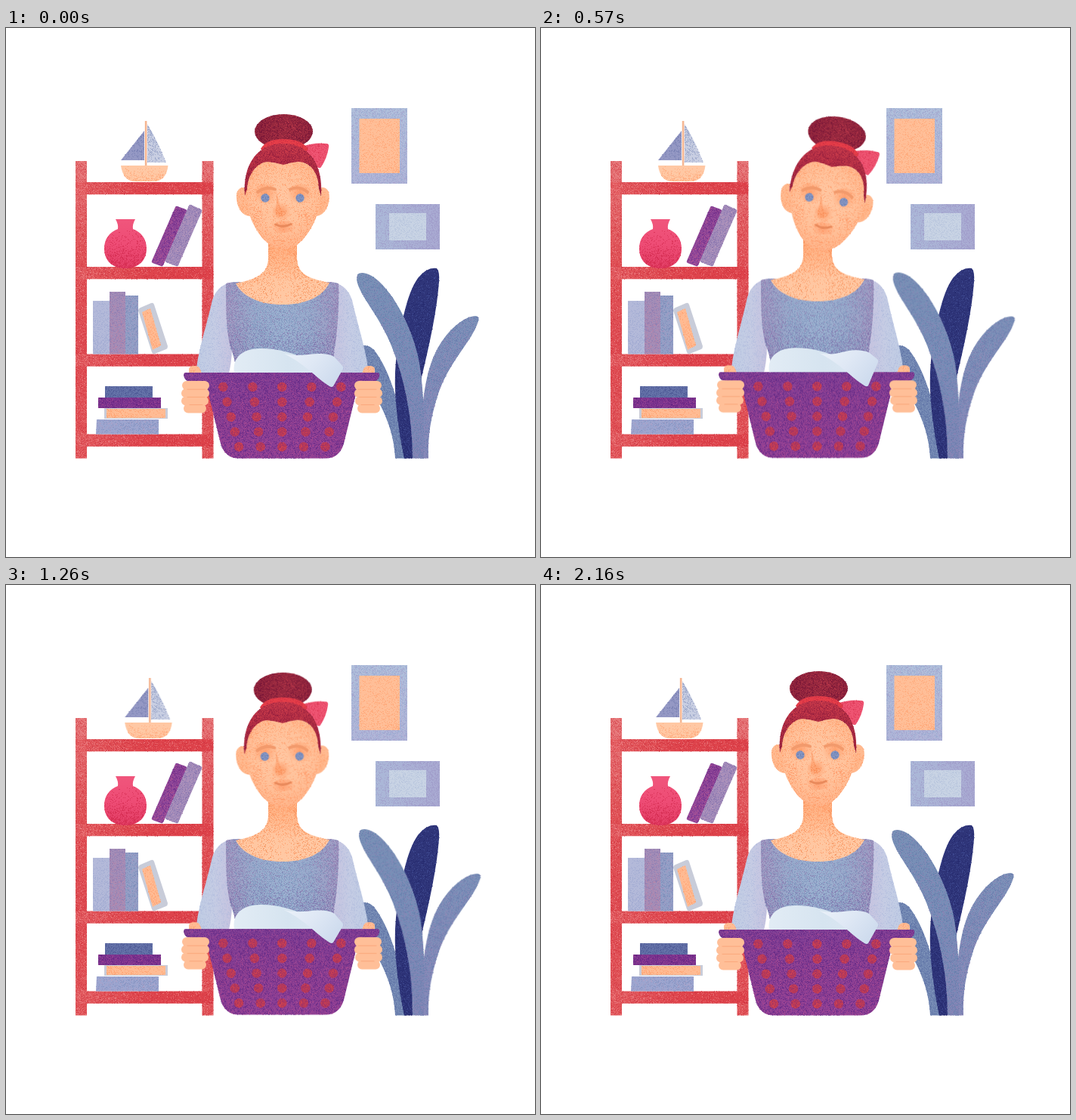
Recreate the animation shown at these times as an HTML page with a canvas. Size 700 px wide and 700 px high, loop 2190 ms.

```html
<!DOCTYPE html>
<html lang="en">
<head>
<meta charset="utf-8">
<title>Laundry day</title>
<style>
  html, body { margin: 0; width: 100%; height: 100%; overflow: hidden; background: #fff; }
  canvas { display: block; }
</style>
</head>
<body>
<canvas id="stage" width="700" height="700"></canvas>
<script>
const SIZE = 700, LOOP = 2190, STEP = 30;
const ctx = document.getElementById('stage').getContext('2d');

const layer = () => {
  const c = document.createElement('canvas');
  c.width = c.height = SIZE;
  return c;
};
const dust = layer();
const dustCtx = dust.getContext('2d', { willReadFrequently: true });

let seed = 7;
const random = () => (seed = (seed * 1664525 + 1013904223) >>> 0) / 4294967296;

// Gradients: stops are colours, or numbers for grain density.
const addStops = (grad, stops) => {
  stops.forEach((s, i) => grad.addColorStop(i / (stops.length - 1),
    typeof s === 'number' ? `rgba(0,0,0,${s})` : s));
  return grad;
};
const ramp = (x0, y0, x1, y1, ...stops) => addStops(ctx.createLinearGradient(x0, y0, x1, y1), stops);
const glow = (x, y, r, ...stops) => addStops(ctx.createRadialGradient(x, y, 0, x, y, r), stops);
const even = a => ramp(0, 0, 1, 0, a, a);

const box = (x, y, w, h) => `M${x} ${y}h${w}v${h}h${-w}z`;
const oval = (x, y, rx, ry) => `M${x - rx} ${y}a${rx} ${ry} 0 1 0 ${2 * rx} 0a${rx} ${ry} 0 1 0 ${-2 * rx} 0z`;

// A sprite gets a painter: paint(path, fill, grain colour, grain density, ...).
function sprite(draw) {
  const canvas = layer(), g = canvas.getContext('2d');
  const paint = (d, fill, ...grains) => {
    const path = new Path2D(d);
    if (fill) { g.fillStyle = fill; g.fill(path); }
    for (let i = 0; i < grains.length; i += 2) grain(path, grains[i], grains[i + 1]);
  };
  const grain = (path, color, density) => {
    dustCtx.clearRect(0, 0, SIZE, SIZE);
    dustCtx.fillStyle = density;
    dustCtx.fill(path);
    const img = dustCtx.getImageData(0, 0, SIZE, SIZE), px = img.data;
    for (let i = 3; i < px.length; i += 4)
      if (px[i]) px[i] = random() * 255 < px[i] ? 155 : 0;
    dustCtx.putImageData(img, 0, 0);
    dustCtx.globalCompositeOperation = 'source-in';
    dustCtx.fillStyle = color;
    dustCtx.fillRect(0, 0, SIZE, SIZE);
    dustCtx.globalCompositeOperation = 'source-over';
    g.drawImage(dust, 0, 0);
  };
  const line = (d, color, width) => {
    g.strokeStyle = color; g.lineWidth = width; g.lineCap = g.lineJoin = 'round';
    g.stroke(new Path2D(d));
  };
  draw(paint, line, g);
  return canvas;
}

const mirrored = (draw, axis = 365) => (paint, line, g) => {
  draw(paint, line);
  g.save();
  g.translate(2 * axis, 0);
  g.scale(-1, 1);
  draw(paint, line);
  g.restore();
};

const room = sprite(paint => {
  const bars = [204, 316, 431.5, 537.5].map(y => box(92, y, 182, 16.3)).join('');
  paint(box(92, 176, 15, 393.5) + box(259.5, 176, 15, 393.5),
    ramp(0, 176, 0, 569, '#e57678', '#e05257', '#df4d53', '#e2585c'), '#ee9296', even(.13), '#d02f3c', even(.2));
  paint(bars, ramp(92, 0, 274, 0, '#e25a5e', '#df454d', '#dd424a'), '#ee8a8e', ramp(92, 0, 274, 0, .3, .08, .12), '#c92c3c', even(.15));

  paint('M145 253H171Q167 260 168 266C179 270 186 279 186 292C186 308 175 318 158 318C141 318 130 308 130 292C130 279 137 270 148 266Q149 260 145 253z',
    ramp(0, 253, 0, 318, '#f0567c', '#ee4c75', '#e33f66'), '#d02449', ramp(0, 262, 0, 318, 0, .15, .5));

  // leaning books
  paint('M227 236L238 240Q240 241 239 243L208 314Q207 316 205 315L194 311Q192 310 193 308L224 237Q225 235 227 236z',
    '#8f4798', '#672486', ramp(230, 236, 200, 316, .4, .15), '#c25c92', ramp(230, 236, 200, 316, .05, .25));
  paint('M245 234L258 240Q260 241 259 243L228 314Q227 316 225 315L212 310Q210 309 211 307L242 235Q243 233 245 234z',
    '#a08ab9', '#7d6aa8', even(.22), '#bf9cbd', even(.2));

  // upright books
  paint(box(115, 361, 22, 70.5), '#b3b9d9', '#9ba6cf', ramp(0, 361, 0, 431, .1, .4));
  paint(box(158, 354, 17, 77.5), '#939fc6', '#7386b3', even(.25), '#a997c0', even(.15));
  paint(box(137, 349, 21, 82.5), '#a38db7', '#8878ae', even(.25), '#bd87a8', ramp(0, 349, 0, 431, .05, .35));
  paint('M178 370L192 364Q195 363 196 366L214 421Q214 424 212 425L197 431Q194 432 193 429L175 374Q175 371 178 370z', '#c8ccd9');
  paint('M180 376L191 371L205 420L194 426z', '#ffba92', '#ff9a68', ramp(0, 370, 0, 426, .1, .3));

  // stacked books
  paint(box(131, 474, 63, 15), '#6472a8', '#46538f', even(.3));
  paint(box(122, 489, 83, 14), '#7d358f', '#5e1d7c', even(.25), '#a94a95', even(.15));
  paint(box(130, 503, 84, 14), '#c8ccd9');
  paint(box(133, 504, 78, 12), '#ffbb93', '#ff9965', ramp(133, 0, 211, 0, .3, .1));
  paint('M120 518H202V537.5H119z', '#9ca5cf', '#7d8cbb', ramp(119, 0, 202, 0, .1, .35), '#b39fc4', even(.12));

  // pictures
  paint(box(457, 106, 74, 100), ramp(0, 106, 0, 206, '#b0bfdb', '#b0b5d8'), '#94a6cd', even(.25), '#a59bc7', even(.15));
  paint(box(467.5, 120, 53.5, 72), '#ffbe97', '#ff9f6d', ramp(467, 120, 521, 192, .1, .3));
  paint(box(489, 233, 85, 60), ramp(489, 0, 574, 0, '#abb8d8', '#a9aad2'), '#9c95c5', ramp(489, 0, 574, 0, .2, .4));
  paint(box(507, 245, 49, 36), '#c8d3e4', '#b2bfda', even(.25));
});

const boat = sprite(paint => {
  paint('M183 136V175H152z', '#9498c4', '#7079ad', ramp(183, 136, 160, 175, .45, .1));
  paint('M187 127Q201 150 212 178H187z', '#c8cee2', '#8391bb', ramp(187, 127, 205, 178, .6, .1));
  paint(box(183.8, 123, 2.6, 60), '#f5b591');
  paint('M152 182H214.5Q212 203 195 203H171Q155 203 152 182z', '#ffc8a4', '#ff9f6e', ramp(0, 184, 0, 204, .03, .4));
});

const backLeaves = sprite(paint => {
  paint('M455 430Q474 412 487 426C508 452 527 510 528 569.5H515C514 540 502 500 474 468z',
    '#7186b1', '#5a6fa4', even(.3), '#8ca2c3', even(.15));
  paint('M570 318Q574 322 573 336C570 376 560 420 550 462C541 500 537 535 538 569.5H527C518 525 512 480 516 440C522 395 530 352 545 331Q557 316 570 318z',
    '#2f3579', '#20246a', ramp(0, 318, 0, 569, .1, .3), '#4957a0', even(.1));
});

const leftLeaf = sprite(paint => paint(
  'M465 326Q471 321 484 328C509 343 538 394 547 443C554 486 553 530 553 569.5H538C538 520 529 469 511 423C495 381 467 354 464 333z',
  ramp(0, 324, 0, 569, '#7990b6', '#778db7', '#7b86b6'), '#6078a7', ramp(480, 324, 550, 569, .2, .35), '#9184b5', ramp(0, 324, 0, 569, .1, .4)));

const rightLeaf = sprite(paint => paint(
  'M621 381Q627 381 625 388C616 416 587 440 572 484C562 515 558 540 559 569.5H548C548 528 551 475 563 442C577 404 604 382 621 381z',
  ramp(0, 380, 0, 569, '#7c91b8', '#8189b9'), '#6577aa', even(.3), '#9787b7', ramp(0, 380, 0, 569, .12, .4)));

const sleeves = sprite(mirrored(paint => paint(
  'M306 336Q281 336 273 360C266 392 256 420 252 450L262 462H294Q299 440 299 425L306 400z',
  ramp(252, 0, 300, 0, '#bfcce4', '#c5cce4', '#c6c2df'),
  '#adb9dc', even(.18)), 365.5));

const torso = sprite(paint => {
  paint('M291 338Q298 336 306 336H426Q434 336 440 338C441 375 438 408 434 430V480H304V448Q302 436 299 428C292 410 291 380 291 338z',
    ramp(291, 0, 440, 0, '#a29bc3', '#98a9cb', '#9bb0d0', '#98a9cb', '#a29bc3'),
    '#778fb8', ramp(0, 340, 0, 460, .2, .35), '#8c74ab', ramp(291, 0, 440, 0, .4, .1, .08, .1, .4),
    '#7868a6', ramp(0, 390, 0, 450, 0, .4));
  paint('M347 255H385V304C385 326 402 332 428 337C419 356 396 366 366 366C337 366 313 356 304 338C331 332 347 326 347 304z',
    ramp(0, 275, 0, 362, '#ffaf80', '#ffb78b', '#ffc6a0', '#ffc8a3'),
    '#ff9560', ramp(0, 280, 0, 362, .55, .4, .15, .08),
    '#f08249', ramp(347, 0, 385, 0, .12, .03, 0, 0, .12));
});

const head = sprite((paint, line, g) => {
  paint('M392 157Q407 151 425 153Q428 154 427 158Q425 172 417 184Q415 187 411 183z',
    '#ee5472', '#d9304f', ramp(395, 160, 426, 170, .4, .08));
  paint(oval(367.5, 137, 38.5, 23), '#96283e',
    '#6c0f34', ramp(329, 120, 406, 156, .5, .15, .4), '#c23c4e', glow(372, 132, 34, .3, 0));
  paint('M337 160Q344 147 367 147Q391 147 400 160L392 170H345z', '#e43d48', '#c22440', even(.2));

  mirrored(paint => paint('M322 214C312 207 304 213 305 225C306 239 313 250 326 249z',
    '#ffba90', '#ff9762', glow(314, 234, 18, .4, .1)), 366.4)(paint, line, g);

  paint('M317 215C317 150 416 150 417 215C417 237 410 260 393 280Q380 293 366 293Q353 292 340 279C324 260 317 237 317 215z',
    glow(366, 226, 72, '#ffc6a1', '#ffc29b', '#ffb186'),
    '#ff945f', ramp(0, 175, 0, 292, .25, .1, .1, .25), '#ff9a66', ramp(317, 0, 417, 0, .22, .02, 0, .02, .22));
  paint('M316 222C313 181 332 153 367 153C402 153 420 182 417 222L414 213C414 190 401 176 386 177Q376 178 367 181Q357 178 347 177C332 177 320 194 319 213z',
    ramp(0, 153, 0, 220, '#b93247', '#b02d43', '#a32840'),
    '#851639', ramp(0, 160, 0, 220, .2, .4), '#d8424e', ramp(0, 153, 0, 182, .35, .05));

  // face
  [343, 389].forEach(x => {
    paint(oval(x, 219, 17, 13), glow(x, 218, 17, 'rgba(255,146,92,.7)', 'rgba(255,146,92,0)'));
    paint(oval(x, 225, 5.7, 5.7), '#8495c2', '#6479ad', even(.3));
  });
  line('M333 217Q344 209 356 213.5', '#f29a6c', 4);
  line('M376 213.5Q388 208 399 217', '#f29a6c', 4);
  paint(oval(364, 242, 13, 13), glow(364, 243, 13, 'rgba(250,138,82,.75)', 'rgba(255,146,92,0)'));
  paint('M357 214Q360 228 356 242Q358 250 364 249Q371 248 371 242Q364 243 363 236z',
    ramp(355, 0, 372, 0, 'rgba(255,156,104,.7)', 'rgba(255,180,136,.5)'), '#f58249', ramp(0, 222, 0, 249, .05, .4));
  paint(oval(367, 263, 16, 8), glow(367, 263, 16, 'rgba(255,140,88,.6)', 'rgba(255,140,88,0)'));
  line('M357 260Q367 265 377 259.5', '#e98a5c', 3);
  [336, 397].forEach(x => paint(oval(x, 249, 14, 14), null, '#ff8a57', glow(x, 249, 14, .25, 0)));
});

const thumbs = sprite(mirrored(paint =>
  paint('M242 462V451Q243 447 249 447Q256 447 257 452L261 462z', '#ffbb93', '#ff9a68', ramp(0, 447, 0, 462, .05, .3))));

const basket = sprite(paint => {
  paint('M238 456H491Q495 456 494 461Q492 468 485 468H467L447 550Q441 569.5 423 569.5H308Q290 569.5 284 550L264 468H245Q237 468 235 460Q235 456 238 456z',
    ramp(0, 456, 0, 569, '#813f95', '#883e92', '#8c3f95'),
    '#5c2482', even(.3), '#b14b92', ramp(0, 456, 0, 569, .08, .2, .24));
  for (let row = 0; row < 5; row++)
    for (let col = -2; col <= 2; col++)
      paint(oval(365.3 + col * (39 - 2.6 * row), 475 + 19.8 * row, 6.2, 6.2),
        '#b93a57', '#e0484e', even(.22), '#8f2a70', even(.22));
});

const fingers = sprite(mirrored((paint, line) => {
  for (let i = 0; i < 4; i++) {
    const y = 473 + 10.2 * i, a = [239, 238, 238, 241][i], b = [263, 263, 262, 259][i];
    line(`M${a} ${y}H${b}`, '#ffbf98', 12);
    if (i) line(`M${a + 2} ${y - 5}H${b + 1}`, 'rgba(245,146,98,.5)', 1);
  }
}));

function drawCloth(dy, lift) {
  const y = 449 + lift;
  ctx.setTransform(1, 0, 0, 1, 0, dy);
  ctx.fillStyle = ramp(302, 0, 446, 0, '#e2ecf5', '#d6e4f0', '#dde7f3');
  ctx.fill(new Path2D('M302 456C299 438 311 424 337 424C360 424 379 430 394 437L412 456z'));
  ctx.fillStyle = ramp(375, 425, 430, 470, '#eaf1f9', '#dfe8f5', '#cfdcee');
  ctx.fill(new Path2D(`M368 431C388 436 403 ${430 + lift / 2} 418 ${431 + lift / 2}Q434 ${432 + lift / 2} 437 ${438 + lift * .7}L445 ${y - 2}Q447 ${y} 446 ${y + 2}L433 474Q431 476 428 474C410 463 398 446 368 431z`));
}

// Cosine easing between [time, value] keys.
function track(t, keys) {
  const i = keys.findIndex(k => k[0] > t);
  if (i < 0) return keys[keys.length - 1][1];
  const [t0, a] = keys[i - 1], [t1, b] = keys[i];
  return a + (b - a) * (1 - Math.cos(Math.PI * (t - t0) / (t1 - t0))) / 2;
}
const tilt = [[0, 0], [370, 8.5], [530, 8.5], [840, -2.8], [1400, 0]];
const nod = [[0, 0], [500, 1.2], [820, 4.5], [1150, 1.8], [1440, 1.8], [2160, 0]];
const breath = [[0, 0], [330, -5], [520, -5], [820, 4.2], [1130, 0]];
const carry = [[0, 0], [250, -5.5], [430, -5.5], [775, 8], [1080, -2.2], [1400, 0]];

function put(img, x = 0, y = 0, angle = 0, px = 0, py = 0) {
  ctx.setTransform(1, 0, 0, 1, x + px, y + py);
  ctx.rotate(angle * Math.PI / 180);
  ctx.drawImage(img, -px, -py);
}

function frame(now) {
  const t = Math.floor(now % LOOP / STEP) * STEP;
  const sway = (1 - Math.cos(2 * Math.PI * t / LOOP)) / 2;
  const body = track(t, breath), load = track(t, carry);

  ctx.setTransform(1, 0, 0, 1, 0, 0);
  ctx.fillStyle = '#fff';
  ctx.fillRect(0, 0, SIZE, SIZE);

  put(room);
  put(boat, 5.5 * sway);
  put(backLeaves);
  put(rightLeaf, 0, 0, .8 * sway, 553, 569);
  put(leftLeaf, 0, 0, .75 * sway, 545, 569);

  // sleeves stretch between shoulders and hands
  const stretch = 1 + (load - body) / 116;
  ctx.setTransform(1, 0, 0, stretch, 0, 340 + body - 340 * stretch);
  ctx.drawImage(sleeves, 0, 0);

  put(torso, 0, body);
  put(head, 0, track(t, nod), track(t, tilt), 367, 309);
  put(thumbs, 0, load);
  put(basket, 0, load);
  drawCloth(load, 2 * body - load);
  put(fingers, 0, load);
  requestAnimationFrame(frame);
}
requestAnimationFrame(frame);
</script>
</body>
</html>
```
